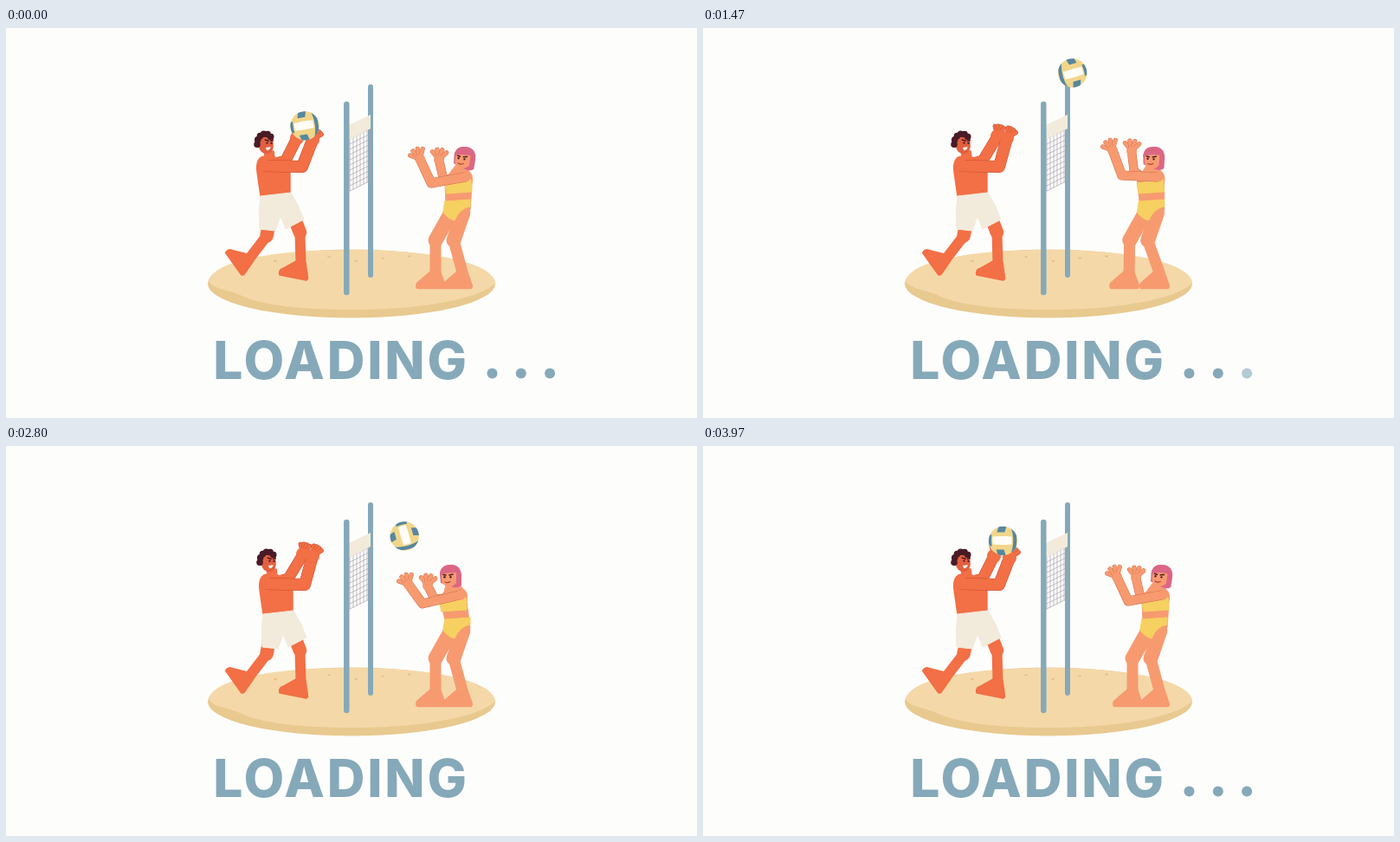
Write an HTML page with a canvas that moves like this. It is 798 px wide and 450 px high and loops after 4010 ms.

```html
<!DOCTYPE html>
<html lang="en">
<head>
<meta charset="utf-8">
<title>Loading</title>
<style>
html, body { margin: 0; width: 100%; height: 100%; overflow: hidden; background: #fdfdfc; }
canvas { display: block; }
</style>
</head>
<body>
<canvas width="798" height="450"></canvas>
<script>
const ctx = document.querySelector('canvas').getContext('2d');
const PERIOD = 2005;
const PAPER = '#fdfdfc', BLUE = '#85a9b9', CREAM = '#f2ebdb', YELLOW = '#f6d060';
const MAN = '#f36f45', MAN_LINE = '#c24f30', WOMAN = '#f79a70', WOMAN_LINE = '#cf704c';
const MAN_HAIR = '#4a1b26', WOMAN_HAIR = '#db6785';

const mix = (a, b, u) => a + (b - a) * u;
const span = (t, from, to) => Math.min(1, Math.max(0, (t - from) / (to - from)));
const ease = (t, from, to) => {
  const u = span(t, from, to);
  return u * u * (3 - 2 * u);
};

function fill(color, d, round = 0) {
  ctx.fillStyle = color;
  ctx.fill(new Path2D(d));
  if (round) line(color, round, d);
}

function line(color, width, d) {
  ctx.strokeStyle = color;
  ctx.lineWidth = width;
  ctx.stroke(new Path2D(d));
}

function circle(color, x, y, rx, ry = rx) {
  ctx.fillStyle = color;
  ctx.beginPath();
  ctx.ellipse(x, y, rx, ry, 0, 0, 2 * Math.PI);
  ctx.fill();
}

function placed(x, y, angle, draw) {
  ctx.save();
  ctx.translate(x, y);
  ctx.rotate(angle);
  draw();
  ctx.restore();
}

// Four fingers fanned around a middle direction
function hand(color, edge, x, y, size, middle, fan) {
  circle(color, x, y, size);
  for (let i = 0; i < 4; i++) {
    const a = middle + fan * (i - 1.5);
    const d = `M${x},${y}l${12 * Math.cos(a)},${12 * Math.sin(a)}`;
    line(edge, 5.2, d);
    line(color, 4.4, d);
  }
  circle(color, x, y, size - 1);
}

function arm(color, edge, width, shoulder, elbow, wrist) {
  const d = `M${shoulder}L${elbow}L${wrist}`;
  line(edge, width + 1, d);
  line(color, width, d);
}

function leg(color, width, hip, knee, ankle, tilt = 0) {
  line(color, width * 1.3, `M${hip}L${knee}`);
  line(color, width, `M${knee}L${ankle}`);
  placed(...ankle, tilt, () => fill(color, 'M-5,-1L5,-1L11,16L10,18L-21,18Q-23,13 -19,11Z', 2.5));
}

function drawCourt() {
  circle('#e8c98f', 399, 295, 166, 39.5);
  fill('#f5d8a8', 'M234,292C240,268 310,256 400,256S562,270 565,294C552,310 490,325 400,325C330,325 290,318 270,308C255,301 240,302 234,292Z');
  for (let i = 0; i < 6; i++) circle('#e9bd85', 311 + 31 * i, 266 + 3 * Math.cos(2 * i), 2, 0.9);
}

function drawNet() {
  line(BLUE, 6, 'M421,68V285');
  for (let i = 0; i <= 6; i++) line('#aaa2aa', 0.7, `M${397 + 4 * i},${127 - 2 * i}v61`);
  for (let i = 0; i <= 10; i++) line('#aaa2aa', 0.7, `M397,${128 + 6 * i}l24,-12`);
  fill(CREAM, 'M396,112L421,100V116L396,129Z');
  line(BLUE, 6.5, 'M393.3,88V305');
}

function drawManHead() {
  fill('#e2603f', 'M-7,-8L9,-8L10,4Q9,11 3,12Q-5,12 -7,4Z');
  for (let i = 0; i < 6; i++) {
    const a = Math.PI * (0.95 + 0.16 * i);
    circle(MAN_HAIR, 9 * Math.cos(a), 11 * Math.sin(a), 3.8);
  }
  line(MAN_HAIR, 1.5, 'M0,-4L4,-3M6.5,-3L9,-4');
  for (const x of [2.5, 7.5]) circle(MAN_HAIR, x, -0.5, 1.2);
  fill('#fff', 'M1,5L7,4Q6,8 3,8Z');
}

function drawMan(t) {
  const lean = 3 * (ease(t, 0, 65) - ease(t, 930, 1250));
  const reach = ease(t, 0, 100) - ease(t, 250, 750);
  const cup = ease(t, 1800, 1965) - ease(t, 0, 65);
  const foot = 4 * reach;
  const x1 = 336 + lean - 4 * cup, y1 = 127 - 12 * reach + 2 * cup;
  const x2 = x1 + 18 + 7 * cup, y2 = y1 + 2;
  const elbow = [323 + lean, 153 - 7 * reach];

  leg(MAN, 12, [304, 225], [301, 240], [281 + foot, 266], 0.95);
  leg(MAN, 12, [334, 222], [339.5, 236], [340.5, 271], 0.2);
  arm(MAN, MAN_LINE, 12, [312 + lean, 156], elbow, [x1, y1]);
  hand(MAN, MAN_LINE, x1, y1, 8, -1.35, 0.3);
  placed(lean, 0, 0, () => {
    fill(MAN, 'M298,142L309,142L310,149L320,152L328,163L328,192L294,194L290,166Q288,149 299,148Z', 1.5);
    fill(CREAM, 'M294,194L329,190L338,206L344,221L323,232L317,217L311,234L293,232Q291,213 294,194Z', 1);
  });
  arm(MAN, MAN_LINE, 13, [299 + lean, 159], [elbow[0] + 19, elbow[1] + 7], [x2, y2]);
  hand(MAN, MAN_LINE, x2, y2, 8, -1, 0.3);
  circle(MAN, 298 + lean, 158, 7.3);
  placed(299 + lean, 133, 0.05, drawManHead);
}

function drawWomanHead() {
  fill(WOMAN_HAIR, 'M-12,-3Q-11,-14 1,-14Q12,-14 13,-2L13,10Q10,13 4,12L-11,7Z');
  fill(WOMAN, 'M-10,-6L7,-6L7,7Q3,12 -3,11Q-10,10 -10,2Z');
  fill(WOMAN_HAIR, 'M-12,-2Q-12,-14 1,-14Q11,-13 11,-4Q0,-7 -12,-2Z');
  line(MAN_HAIR, 1.5, 'M-8,-2.5L-5,-2M-1,-2L3,-3');
  for (const x of [-6.5, 0.5]) circle(MAN_HAIR, x, 0.3, 1.2);
  line('#a84532', 1.2, 'M-6,6Q-3,7.5 0,5.5');
}

function drawWoman(t) {
  const raise = ease(t, 1040, 1240);
  const wait = ease(t, 100, 750) - raise;
  const toss = raise - ease(t, 1240, 1740);
  const head = -16 * (wait + toss), chest = -6 * wait - 10 * toss;
  const hip = -6 * toss, foot = -7 * toss, neck = (head + chest) / 2;
  const elbow = [491 - 10 * wait - 13 * toss, 179 + 3 * wait - 16 * toss];
  const x1 = 478 - 13 * wait - 9 * toss, y1 = 151 + 9 * wait - 18 * toss;
  const x2 = x1 + 22, y2 = y1 + 1;

  arm(WOMAN, WOMAN_LINE, 9.5, [517 + chest, 175], [elbow[0] + 14, elbow[1] - 5], [x2, y2]);
  hand(WOMAN, WOMAN_LINE, x2, y2, 6, -1.5, 0.5);
  leg(WOMAN, 13, [514 + hip, 213], [496 + hip, 245], [496 + foot, 282]);
  leg(WOMAN, 13, [528 + hip, 213], [517 + hip, 245], [527, 282]);
  fill(WOMAN, `M${520 + neck},158L${533 + neck},158L${534 + chest},165Q${540 + chest},168 ${538 + chest},180L${536 + hip},210L${508 + hip},205L${507 + chest},176L${512 + chest},168Z`, 1);
  fill(YELLOW, `M${507 + chest},179l30,-4l1,14l-29,2Z`, 1);
  fill(YELLOW, `M${507 + hip},200l29,-2v8q-12,2 -18,16q-8,-2 -13,-9Z`, 1);
  arm(WOMAN, WOMAN_LINE, 10, [530 + chest, 172], elbow, [x1, y1]);
  circle(WOMAN, 531 + chest, 172, 5.6);
  hand(WOMAN, WOMAN_LINE, x1, y1, 6, -2.05, 0.5);
  placed(529 + head, 151, 0.16 + head / 100, drawWomanHead);
}

// Pushed up by the man, lobbed over, caught, lobbed back
function ballAt(t) {
  const lob = (u, x0, y0, x1, y1, height) => [mix(x0, x1, u), mix(y0, y1, u) - 4 * height * u * (1 - u)];
  if (t < 65) return [345 + 4 * t / 65, 113 - 8 * t / 65, 10 * t / 65 - 10];
  if (t < 950) {
    const s = span(t, 65, 950);
    return [...lob(1 - (1 - s) ** 1.3, 349, 105, 473, 133, 71), 525 * s];
  }
  const s = span(t, 1130, 1975);
  const dip = 7 * Math.sin(Math.PI * span(t, 950, 1130));
  const [x, y] = lob(s ** 1.12, 473, 133, 345, 113, 80);
  return [x, y + dip, 525 - 895 * s];
}

function drawBall(t) {
  const [x, y, spin] = ballAt(t);
  placed(x, y, spin * Math.PI / 180, () => {
    const seam = '#5787a0';
    circle('#f1d68a', 0, 0, 16.7);
    ctx.clip(new Path2D('M-16.7,0a16.7,16.7 0 1 0 33.4,0a16.7,16.7 0 1 0 -33.4,0'));
    fill(seam, 'M9,-16Q15,0 8,17L13,17Q18,0 14,-16Z');
    fill(seam, 'M-17,-7L-13,-7Q-14,0 -13,6L-17,6Z');
    fill(seam, 'M-5,-17L4,-17L2,-10L-7,-10Z');
    fill(seam, 'M-8,10L1,10L3,17L-6,17Z');
    fill('#fffdf6', 'M-12,-5Q0,-6 10,-5L10,4Q0,5 -12,4Z');
  });
}

function drawCaption(t) {
  ctx.fillStyle = BLUE;
  ctx.font = '800 60.5px Inter, "Open Sans", sans-serif';
  ctx.letterSpacing = '2.8px';
  ctx.textAlign = 'center';
  ctx.fillText('LOADING', 387, 405);
  for (let i = 0; i < 3; i++) {
    ctx.globalAlpha = t < 800 ? 1 - span(t, 480, 730) : span(t, 890 + 200 * i, 1190 + 200 * i);
    circle(BLUE, 561.5 + 33.3 * i, 398.5, 6);
  }
  ctx.globalAlpha = 1;
}

function draw() {
  const t = performance.now() % PERIOD;
  ctx.fillStyle = PAPER;
  ctx.fillRect(0, 0, 798, 450);
  drawCourt();
  drawNet();
  drawMan(t);
  drawWoman(t);
  drawBall(t);
  drawCaption(t);
  requestAnimationFrame(draw);
}

ctx.lineCap = ctx.lineJoin = 'round';
draw();
</script>
</body>
</html>
```
